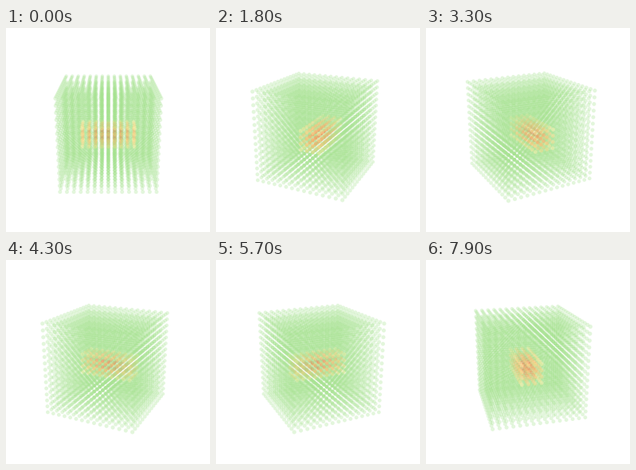
Write a matplotlib script that moves like this. It is 256 by 256 pixels and loops after 8000 ms.

```python
import numpy as np
import matplotlib.pyplot as plt
from matplotlib.animation import FuncAnimation

SIZE, DPI = 256, 100
FRAMES, INTERVAL = 80, 100
STEP = np.radians(3.6)            # turn per frame
ELEV = np.radians(20)
DIST, FOCAL = 4.3, 485
CX, CY = 128.4, 128.0
N = 15
DOT = 0.041                       # dot diameter, cube side = 1

# Lattice of dots with a small hot block inside
k = np.arange(N) - N // 2
X, Y, Z = (a.ravel() for a in np.meshgrid(k, k, k, indexing="ij"))
block = np.array([X / 4, (Y + 0.5) / 1.5, (Z + 0.5) / 1.5])
hot = (np.abs(block) <= 1).all(axis=0)
heat = np.linalg.norm(block, axis=0)

colors = np.empty((X.size, 4))
colors[:] = (0.64, 0.885, 0.55, 0.3)
colors[hot] = plt.get_cmap("RdYlGn")(0.1 + 0.2 * heat[hot])
colors[hot, 3] = 0.45
x, y, z = X / (N - 1), Y / (N - 1), Z / (N - 1)


def project(angle):
    """Screen position, scale and depth of every dot."""
    u = x * np.cos(angle) - y * np.sin(angle)
    w = x * np.sin(angle) + y * np.cos(angle)
    depth = DIST + w * np.cos(ELEV) - z * np.sin(ELEV)
    up = z * np.cos(ELEV) + w * np.sin(ELEV)
    scale = FOCAL / depth
    return np.column_stack([CX + u * scale, CY - up * scale]), scale, depth


fig = plt.figure(figsize=(SIZE / DPI, SIZE / DPI), dpi=DPI, facecolor="white")
ax = fig.add_axes([0, 0, 1, 1])
ax.set_xlim(0, SIZE)
ax.set_ylim(SIZE, 0)
ax.axis("off")
dots = ax.scatter(np.zeros(X.size), np.zeros(X.size), s=1, c=colors, linewidths=0)


def update(i):
    pos, scale, depth = project(i * STEP)
    # The block is pulled forward so that it glows through the lattice
    order = np.argsort(-(depth - 0.35 * hot), kind="stable")
    dots.set_offsets(pos[order])
    dots.set_sizes((DOT * scale[order] * 72 / DPI) ** 2)
    dots.set_facecolors(colors[order])
    return (dots,)


anim = FuncAnimation(fig, update, frames=FRAMES, interval=INTERVAL,
                     repeat=True, repeat_delay=0, blit=False)
plt.show()
```
